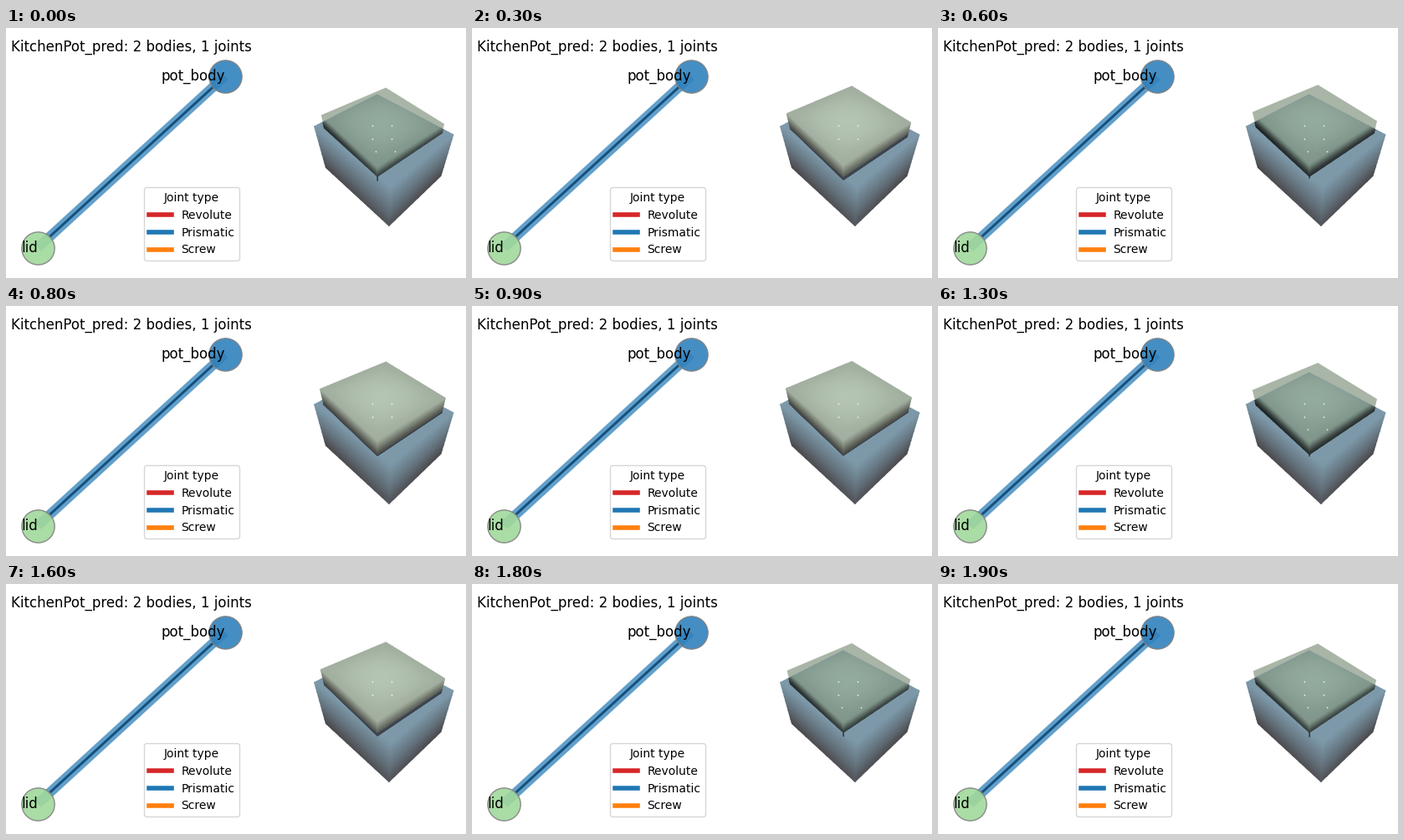
Recreate the animation shown at these times as a matplotlib script. Size 550 by 300 pixels, loop 2 s.

```python
import numpy as np
import matplotlib.pyplot as plt
from matplotlib.animation import FuncAnimation
from matplotlib.colors import LinearSegmentedColormap
from matplotlib.lines import Line2D
from matplotlib.path import Path

plt.rcParams["font.family"] = "DejaVu Sans"

FRAMES = 20
FOCAL = 150 / np.tan(np.pi / 6)  # 60 degree field of view on 300 pixels
RIM = 0.1334                     # height of the pot's upper face
RIM_LEVEL, BASE_LEVEL = 0.8, 0.04


def ramp(*colors):
    return LinearSegmentedColormap.from_list("ramp", colors)


POT = ramp("#464042", "#64737d", "#809dae")
LID = ramp("#3e3e3c", "#6c7168", "#96a192", "#b5c5b4")
LID_SUNK = ramp("#3a404a", "#78919b")
LID_OVER_POT = ramp("#14191b", "#3c4644", "#768a80", "#93ab9e")
LID_OVER_WHITE = "#a9b5a6"

fig = plt.figure(figsize=(5.5, 3), dpi=100, facecolor="white")
ax = fig.add_axes((0, 0, 1, 1))
ax.set_xlim(0, 550)
ax.set_ylim(300, 0)
ax.autoscale(False)
ax.axis("off")


def project(point):
    """Pinhole view from 45 degrees above, at distance 1 from the origin."""
    right, near, up = point
    depth = 1 - (near + up) / np.sqrt(2)
    return 450 + FOCAL * right / depth, 150 - FOCAL * (up - near) / np.sqrt(2) / depth


def rectangle(half_a, half_b, turn, height, tilt=(0, 0)):
    """Left, back, right and front corner of a level or tilted rectangle."""
    a = half_a * np.array([np.cos(turn), np.sin(turn)])
    b = half_b * np.array([-np.sin(turn), np.cos(turn)])
    flat = [b - a, -a - b, a - b, a + b]
    return [np.array([*p, height + np.dot(tilt, p)]) for p in flat]


def shade(corners, levels, cmap, zorder, glow=0.0, n=10):
    """Smoothly shaded quad, its corners in order, brighter by glow in the middle."""
    u, v = np.meshgrid(np.linspace(0, 1, n), np.linspace(0, 1, n))
    weights = ((1 - u) * (1 - v), u * (1 - v), u * v, (1 - u) * v)

    def blend(values):
        return sum(w * c for w, c in zip(weights, values))

    x, y = (blend(axis) for axis in zip(*map(project, corners)))
    level = blend(levels) + glow * 16 * u * (1 - u) * v * (1 - v)
    return ax.pcolormesh(x, y, level, cmap=cmap, vmin=0, vmax=1,
                         shading="gouraud", zorder=zorder)


def shade_sides(upper, lower, upper_levels, lower_levels, cmap, zorder):
    """The two sides that face the camera: left to front and front to right."""
    return [shade([upper[i], upper[j], lower[j], lower[i]],
                  [upper_levels[i], upper_levels[j], lower_levels[j], lower_levels[i]],
                  cmap, zorder)
            for i, j in ((0, 3), (3, 2))]


def outline(top, bottom):
    left, back, right, _ = top
    return [project(p) for p in (left, back, right, bottom[2], bottom[3], bottom[0], left)]


def draw_graph():
    lid, body = np.array([37.8, 263.7]), np.array([261.8, 57.7])
    ax.plot(*zip(lid, body), color="tab:blue", alpha=0.7, lw=8.5,
            solid_capstyle="butt", zorder=1)
    trim = 0.056 * (body - lid)
    ax.plot(*zip(lid + trim, body - trim), color="#14507d", lw=2.1,
            solid_capstyle="butt", zorder=1.5)
    for (x, y), name, color in ((body, "pot_body", "#3182bd"), (lid, "lid", "#a1d99b")):
        ax.scatter(x, y, s=800, color=color, edgecolors="gray", linewidths=1,
                   alpha=0.9, zorder=2)
        ax.text(x, y, name, fontsize=12, ha="right", va="center", zorder=3)
    ax.text(150, 27.7, "KitchenPot_pred: 2 bodies, 1 joints", fontsize=12,
            ha="center", va="baseline")
    joints = {"Revolute": "tab:red", "Prismatic": "tab:blue", "Screw": "tab:orange"}
    ax.legend(handles=[Line2D([], [], color=c, lw=4, label=k) for k, c in joints.items()],
              title="Joint type", fontsize=10, title_fontsize=10, loc="lower right",
              bbox_to_anchor=(279, 279), bbox_transform=ax.transData, borderaxespad=0)


def draw_pot():
    top, bottom = (rectangle(0.224, 0.1855, np.pi / 4, h) for h in (RIM, -RIM))
    shade(top, [0.95] * 4, POT, 4)
    base = [0.08 + 0.4 * max(p[1], 0) for p in bottom]
    shade_sides(top, bottom, [0.95] * 4, base, POT, 4)
    return Path(outline(top, bottom))


def draw_lid(step):
    height = 0.1895 + 0.0024 * step
    top, bottom = (rectangle(0.174, 0.174, np.radians(48.9), h, tilt=(-0.037, -0.03))
                   for h in (height, height - 0.075))
    # Part of each upright edge that stands above the rim
    share = [min(1, (t[2] - RIM) / (t[2] - b[2])) for t, b in zip(top, bottom)]
    cut = [t + k * (b - t) for t, b, k in zip(top, bottom, share)]
    cut_levels = [RIM_LEVEL + k * (BASE_LEVEL - RIM_LEVEL) for k in share]
    rim_levels, base_levels = [RIM_LEVEL] * 4, [BASE_LEVEL] * 4

    see_through = step % 6 < 2
    cmap = LID_OVER_POT if see_through else LID
    parts = shade_sides(top, cut, rim_levels, cut_levels, cmap, 5)
    parts.append(shade(top, rim_levels, cmap, 5, glow=0.2))
    if see_through:
        for part in parts:
            part.set_clip_path(pot_outline, ax.transData)
        parts += ax.fill(*zip(*outline(top, cut)), color=LID_OVER_WHITE, lw=0, zorder=3.5)
        parts += ax.plot(*zip(project(cut[3]), project(bottom[3])),
                         color="#1e2426", lw=0.9, solid_capstyle="butt", zorder=6)
    else:
        parts += shade_sides(cut, bottom, cut_levels, base_levels, LID_SUNK, 4.5)

    glints = [(437.5 + 23 * col + 2 * row * (row - 1), 117 + 15.5 * row)
              for row in range(3 if see_through else 2) for col in range(2)]
    parts.append(ax.scatter(*zip(*glints), s=1.6, color="white", alpha=0.85,
                            linewidths=0, zorder=7))
    return parts


lid_parts = []


def update(frame):
    while lid_parts:
        lid_parts.pop().remove()
    step = min(frame, FRAMES - 1 - frame)  # up, then back down
    lid_parts.extend(draw_lid(step))
    return lid_parts


draw_graph()
pot_outline = draw_pot()
anim = FuncAnimation(fig, update, frames=FRAMES, interval=100, repeat=True, blit=False)
plt.show()
```
